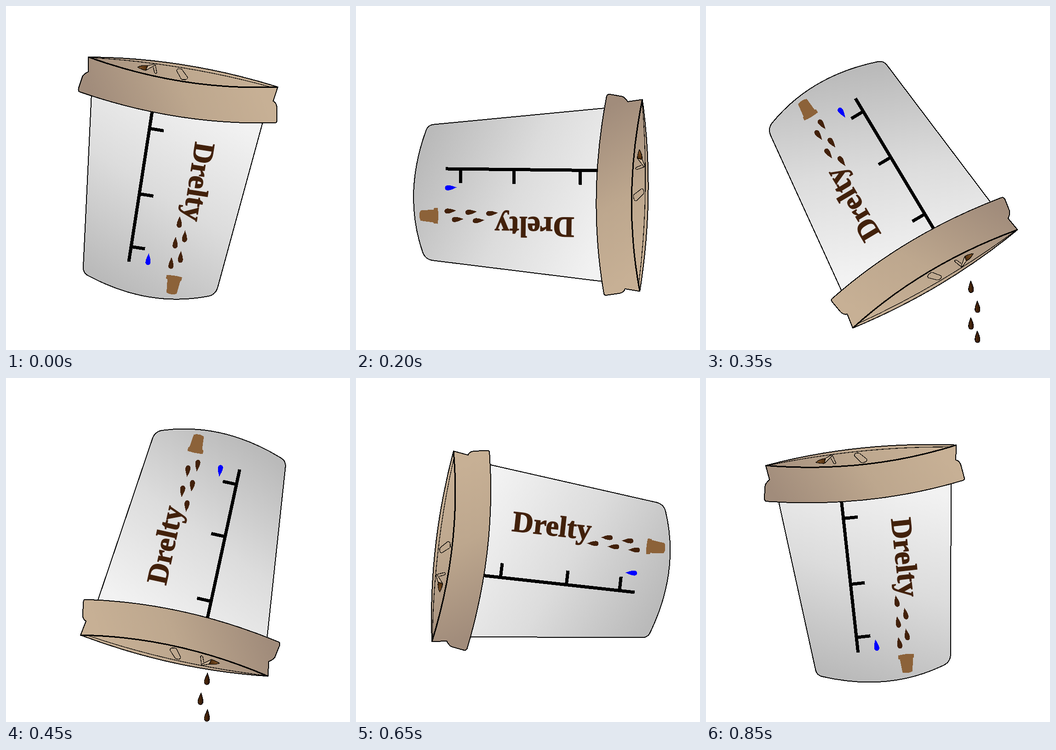
Animation, 748 px wide and 748 px high, one loop 0.9 s. Source, as an HTML page:

```html
<!DOCTYPE html>
<html lang="en">
<head>
<meta charset="utf-8">
<title>Tumbling coffee cup</title>
<style>
  html, body { margin: 0; width: 100%; height: 100%; overflow: hidden; background: #fff; }
  svg { display: block; width: 100vw; height: 100vh; shape-rendering: crispEdges; }
  .line { stroke: #000; stroke-width: 2; stroke-linejoin: round; }
  .thin { stroke: #000; stroke-width: 1.3; stroke-linejoin: round; }
  .name { font: bold 64px "Liberation Serif", "Times New Roman", serif; fill: #42210b; stroke: #42210b; stroke-width: 1.2; }
</style>
</head>
<body>
<svg viewBox="0 0 748 748">
  <defs>
    <linearGradient id="paper" gradientUnits="userSpaceOnUse" x1="470" y1="230" x2="230" y2="605">
      <stop stop-color="#f2f2f2"/><stop offset=".5" stop-color="#dcdcdc"/><stop offset="1" stop-color="#bababa"/>
    </linearGradient>
    <linearGradient id="tan" gradientUnits="userSpaceOnUse" x1="530" y1="120" x2="210" y2="250">
      <stop stop-color="#c7b095"/><stop offset=".45" stop-color="#bda78e"/><stop offset="1" stop-color="#a18c7b"/>
    </linearGradient>
    <linearGradient id="hole">
      <stop stop-color="#8a5a2b"/><stop offset="1" stop-color="#4a2a0c"/>
    </linearGradient>
    <linearGradient id="coffee">
      <stop stop-color="#55300f"/><stop offset="1" stop-color="#2c1405"/>
    </linearGradient>
    <path id="drop" d="M0 0C2 6 5.5 12 5.5 19C5.5 23 3 25.5 0 25.5S-5.5 23-5.5 19C-5.5 12-2 6 0 0Z"/>
  </defs>
  <g id="cup">
    <path class="line" fill="url(#paper)" d="M186 190L168 567Q167 581 180 587Q310 656 440 631Q455 628 460 613L559 250Z"/>
    <path fill="none" stroke="#000" stroke-width="7" d="M318 228L267 556M314 266.5L343 271.3M290 408.5L320.5 413.3M272 523.3L302.2 528"/>
    <text class="name" transform="translate(412 294) rotate(98.9)">Drelty</text>
    <g id="print" fill="#42210b"></g>
    <path fill="#8c6239" d="M349 585Q366 585 383 590L381 598L379 598L371 626Q358 629 349 623L351 594L348 593Z"/>

    <path class="line" fill="url(#tan)" d="M179 111V143Q166 149 165 157L158 178Q156 185 161 187Q373 260 585 254Q589 254 589 249V220Q588 210 581 207L591 176Q385 112 179 111Z"/>
    <path class="thin" fill="none" d="M182 112Q385 124 575 176"/>
    <path fill="none" stroke="#000" stroke-width="3" d="M179 111Q385 185 591 176"/>
    <path class="thin" fill="none" d="M320 133L323 145Q326 149 328 145L325 129M373 137Q381 135 384 140L395 155Q395 161 386 160Q381 161 379 155L371 141Q371 138 373 137Z"/>
    <path class="thin" fill="#c7b095" d="M308 130L323 126L325 128L304 140Z"/>
    <path class="thin" fill="url(#hole)" d="M286 133Q296 128 308 130L304 140Q297 139 286 133Z"/>
  </g>
  <g id="drips" class="thin" fill="url(#coffee)"></g>
</svg>
<script>
const STEP_MS = 50, STEPS = 18;
const pivot = { x: 360.3, y: 361.1 }, tilt = 8.9;
const spout = { x: 297, y: 136 };

// Key poses of the wobbly turn: step, angle, pivot x, pivot y
const poses = [
  [0, tilt, pivot.x, pivot.y], [4, 90.7, 401, 418.5], [7, 149.1, 378, 410.4],
  [9, 192.3, 403.4, 388], [11, 230.7, 407.6, 360.2], [13, 276.4, 407, 381.3],
  [17, 353.8, 370, 384.5], [STEPS, tilt + 360, pivot.x, pivot.y]
];

const cup = document.getElementById("cup");
const drips = document.getElementById("drips");

const drop = (x, y, turn, fill = "") =>
  `<use href="#drop" transform="translate(${x} ${y}) rotate(${turn})" ${fill}/>`;
const repeat = (count, make) => Array.from({ length: count }, (_, i) => make(i)).join("");

// Printed drops zigzag down towards the small cup
document.getElementById("print").innerHTML =
  repeat(5, i => drop(378 - 4.5 * i + 16 * (i % 2), 457 + 22.3 * i + 9 * (i % 2), 4)) +
  drop(310.5, 538, 5, 'fill="#00f"');

function poseAt(step) {
  const i = poses.findIndex(p => p[0] > step);
  const a = poses[i - 1], b = poses[i];
  const k = (step - a[0]) / (b[0] - a[0]);
  return a.map((v, j) => v + (b[j] - v) * k);
}

// Coffee falls below the spout while the cup is upside down, and runs dry
function spill(step, turn, x, y) {
  if (step < 6 || step > 11) return "";
  const r = turn * Math.PI / 180, dx = spout.x - pivot.x, dy = spout.y - pivot.y;
  const holeX = x + dx * Math.cos(r) - dy * Math.sin(r);
  const holeY = y + dx * Math.sin(r) + dy * Math.cos(r);
  const side = step < 9 ? 1 : -1;
  return repeat(Math.min(4, Math.round((15 - step) / 2)), i => drop(
    holeX - 5 + side * (10 + 14 * (i % 2)),
    holeY + 40 + side * 15 + i * (47 - 3.6 * i),
    1 - 3 * side));
}

function draw() {
  const step = Math.floor(performance.now() / STEP_MS) % STEPS;
  const [, angle, x, y] = poseAt(step);
  const turn = angle - tilt;
  cup.setAttribute("transform",
    `translate(${x} ${y}) rotate(${turn}) translate(${-pivot.x} ${-pivot.y})`);
  drips.innerHTML = spill(step, turn, x, y);
  requestAnimationFrame(draw);
}
draw();
</script>
</body>
</html>
```
